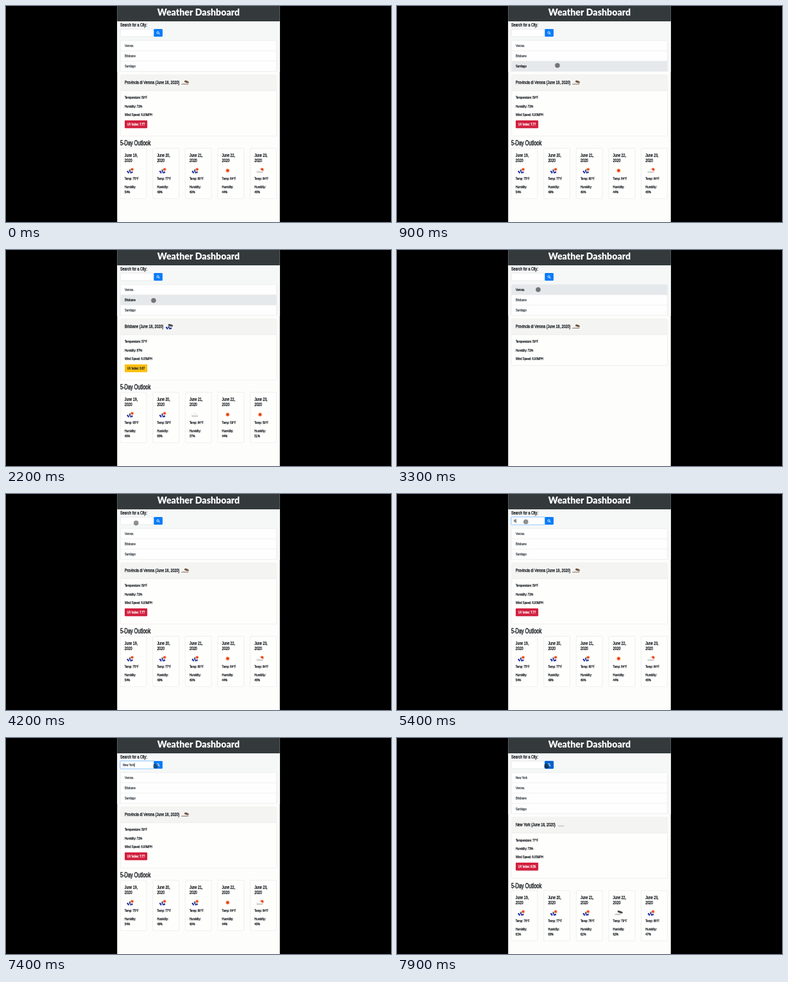
Recreate the animation shown at these times as an HTML page with a canvas. Size 600 by 338 pixels, loop 8 s.

```html
<!DOCTYPE html>
<html lang="en">
<head>
<meta charset="utf-8">
<title>Weather Dashboard</title>
<style>
html, body { margin: 0; width: 100%; height: 100%; overflow: hidden; background: #000; }
canvas { display: block; }
</style>
</head>
<body>
<canvas id="stage" width="600" height="338"></canvas>
<script>
const ctx = document.getElementById('stage').getContext('2d');
const LOOP = 8000, ROW = 16.1, NARROW = 0.715;
const FACE = '"Liberation Sans", Arial, sans-serif';
const INK = '#212529', LINE = '#dfe0e1';
const RED = '#d2203f', GREEN = '#2fb84a', YELLOW = '#fdc010';

// day: [icon, temperature, humidity]
const cities = {
  verona: { name: 'Provincia di Verona', icon: 'mixed', temp: 59, hum: 72, wind: '6.93', uv: '7.77', color: RED,
    days: [['rain', 75, 54], ['rain', 77, 49], ['rain', 80, 49], ['sun', 84, 44], ['fair', 84, 46]] },
  santiago: { name: 'Santiago', icon: 'clouds', temp: 50, hum: 81, wind: '1.79', uv: '2.69', color: GREEN,
    days: [['rain', 53, 62], ['clouds', 56, 57], ['clouds', 58, 42], ['clouds', 58, 47], ['rain', 49, 73]] },
  brisbane: { name: 'Brisbane', icon: 'shower', temp: 57, hum: 87, wind: '8.05', uv: '3.67', color: YELLOW,
    days: [['rain', 65, 49], ['rain', 59, 83], ['cloud', 64, 37], ['sun', 59, 44], ['sun', 59, 51]] },
  newYork: { name: 'New York', icon: 'flat', temp: 77, hum: 73, wind: '8.05', uv: '9.59', color: RED,
    days: [['rain', 76, 61], ['rain', 77, 63], ['rain', 78, 62], ['clouds', 79, 62], ['rain', 86, 47]] }
};

// [start, city, fully loaded]
const loads = [
  [0, 'verona', true], [1000, 'santiago', false], [1100, 'santiago', true],
  [2000, 'brisbane', false], [2150, 'brisbane', true],
  [3200, 'verona', false], [3400, 'verona', true],
  [7600, 'newYork', false], [7750, 'newYork', true]
];
// [time, x, y]
const pointer = [
  [400, 262, 112], [800, 250, 93], [1500, 250, 93], [1900, 230, 79],
  [2700, 230, 79], [3050, 220, 62], [3800, 220, 62], [4300, 200.8, 43.5],
  [7000, 200.8, 43.5], [7300, 233, 44], [8000, 233, 44]
];
const presses = [[900, 1100], [1950, 2350], [3150, 3450], [4350, 4450], [7450, 8000]];
const keys = [5300, 5500, 5650, 5800, 5950, 6050, 6150, 6250];

function text(s, x, y, size = 5.27, color = INK) {
  ctx.save();
  ctx.translate(x, y);
  ctx.scale(NARROW, 1);
  ctx.font = `${size * 1.13}px ${FACE}`;
  ctx.fillStyle = ctx.strokeStyle = color;
  ctx.lineWidth = size * 0.06;
  ctx.lineJoin = 'round';
  ctx.fillText(s, 0, 0);
  ctx.strokeText(s, 0, 0);
  const width = ctx.measureText(s).width * NARROW;
  ctx.restore();
  return width;
}

function textWidth(s, size) {
  ctx.font = `${size * 1.13}px ${FACE}`;
  return ctx.measureText(s).width * NARROW;
}

function box(x, y, w, h, fill, stroke, r = 1.3, weight = 0.5) {
  ctx.beginPath();
  ctx.roundRect(x, y, w, h, r);
  if (fill) { ctx.fillStyle = fill; ctx.fill(); }
  if (stroke) { ctx.strokeStyle = stroke; ctx.lineWidth = weight; ctx.stroke(); }
}

function blob(x, y, rx, ry, color, tilt = 0) {
  ctx.beginPath();
  ctx.ellipse(x, y, rx, ry, tilt, 0, 7);
  ctx.fillStyle = color;
  ctx.fill();
}

function line(x1, y1, x2, y2, color, weight = 0.6) {
  ctx.beginPath();
  ctx.moveTo(x1, y1);
  ctx.lineTo(x2, y2);
  ctx.strokeStyle = color;
  ctx.lineWidth = weight;
  ctx.stroke();
}

function sun(x, y, r) {
  blob(x, y, r + 0.9, r + 0.9, '#ffb58a');
  blob(x, y, r, r, '#e8401c');
}

function drops() {
  for (const [x, y] of [[-4, 1.8], [-2.8, 3.4], [-0.6, 1.2], [0.8, 3.4], [2.8, 3]]) {
    blob(x, y, 1.2, 1.3, '#1c2a94', 0.4);
  }
}

function paleCloud() {
  blob(-1, 1.2, 4.6, 1.8, '#d2d2d2');
  blob(-0.5, 0, 2.6, 1.6, '#d2d2d2');
  blob(-1, 0.9, 4.3, 1.5, '#f6f6f6');
  blob(-0.5, -0.1, 2.2, 1.3, '#f6f6f6');
  line(-5.5, 2.9, 4.5, 2.9, '#a39b99', 0.8);
}

const icons = {
  rain() { drops(); sun(3, -1.6, 1.7); blob(-0.5, -0.6, 1.6, 0.8, '#555a78'); },
  sun() { sun(0, 0.3, 2.2); },
  cloud: paleCloud,
  fair() { sun(3, -1.3, 2); paleCloud(); },
  clouds() {
    blob(2.3, -1, 4.3, 1.7, '#4a4a4a', 0.3);
    blob(-1, 1.4, 3.5, 1.1, '#ededed');
    line(-6, 2.9, 3, 2.9, '#8a8a8a', 0.9);
  },
  mixed() {
    blob(2.2, -0.8, 3.6, 1.8, '#665044', 0.35);
    blob(4, 0.6, 1.3, 1, '#b2884e');
    blob(-1, 1.2, 3.5, 1.2, '#eee6e1');
    line(-6, 2.8, 5, 2.8, '#7c655a', 0.9);
  },
  shower() { drops(); blob(2.2, -1.6, 4, 1.8, '#4c4f4a', 0.3); },
  flat() {
    blob(0, 0.8, 4.5, 1.5, '#f0f0f0');
    line(-5, 2.2, 5, 2.2, '#b0b0b0', 0.9);
  }
};

function icon(kind, x, y) {
  ctx.save();
  ctx.translate(x, y);
  icons[kind]();
  ctx.restore();
}

function pointerAt(t) {
  if (t < 400 || (t >= 5500 && t < 7000)) return null;
  const i = pointer.findIndex(p => p[0] > t);
  const [t0, x0, y0] = pointer[i - 1], [t1, x1, y1] = pointer[i];
  const u = (t - t0) / (t1 - t0), e = u * u * (3 - 2 * u);
  return { x: x0 + (x1 - x0) * e, y: y0 + (y1 - y0) * e };
}

function drawSearch(t) {
  text('Search for a City:', 178, 32, 6.7);
  const focus = t >= 4400 && t < 7450, clicked = t >= 7450;
  if (focus) box(177.6, 35.6, 53.3, 12.8, null, '#bfdeff', 1.6, 1.4);
  box(178.2, 36.2, 52.4, 11.8, '#fff', focus ? '#80bdff' : '#ced4da');
  if (clicked) box(229.7, 35.4, 14.8, 13.2, '#8fc2fb', null, 2);
  box(230.4, 36, 13.6, 12, clicked ? '#0062cc' : '#087cf8');
  ctx.beginPath();
  ctx.arc(236.7, 41.7, 1.6, 0, 7);
  ctx.strokeStyle = '#fff';
  ctx.lineWidth = 0.9;
  ctx.stroke();
  line(237.9, 42.9, 239.4, 44.4, '#fff', 1);
  const typed = t < 7600 ? 'New York'.slice(0, keys.filter(k => k <= t).length) : '';
  const w = text(typed, 182, 44, 5.27, '#495057');
  if (focus && (t - 200) % 1000 < 600) line(182.5 + w, 39, 182.5 + w, 45.5, '#222', 0.6);
}

function drawList(names, at, pressed) {
  const h = names.length * ROW;
  box(178.2, 54, 243.4, h, '#fefefe', LINE);
  names.forEach((name, i) => {
    const y = 54 + i * ROW;
    const over = at && at.y >= y && at.y < y + ROW;
    if (over) box(178.4, y + 0.2, 243, ROW - 0.4, pressed ? '#e6e9ec' : '#f3f4f6', null, 0);
    if (i) line(178.2, y, 421.6, y, LINE, 0.5);
    text(name, 185, y + 10.2, 5.27, over && pressed ? INK : '#495057');
  });
}

function drawCity(c, full) {
  box(178.2, 107.8, 243.4, full ? 95.6 : 73, '#fefefd', LINE);
  box(178.4, 108, 243, 24.6, '#f4f4f3', null, 1);
  line(178.2, 132.6, 421.6, 132.6, LINE, 0.5);
  const w = text(`${c.name} (June 18, 2020)`, 185, 122, 6.65);
  icon(c.icon, 185 + w + 9, 119.5);
  text(`Temperature: ${c.temp}°F`, 185, 145.4);
  text(`Humidity: ${c.hum}%`, 185, 158.8);
  text(`Wind Speed: ${c.wind}MPH`, 185, 172);
  if (!full) return;

  const label = `UV Index: ${c.uv}`;
  box(185, 179, textWidth(label, 5.1) + 8, 12.3, c.color);
  text(label, 189, 187.2, 5.1, c.color === YELLOW ? INK : '#fff');

  text('5-Day Outlook', 178, 218.4, 9.2);
  c.days.forEach(([kind, temp, hum], i) => {
    const x = 178.2 + i * 50.6, tx = x + 6.6;
    box(x, 222.6, 40.8, 78.8, '#fefefd', LINE);
    text(`June ${19 + i},`, tx, 236, 6.6);
    text('2020', tx, 243.8, 6.6);
    icon(kind, x + 15.4, 257.2);
    text(`Temp: ${temp}°F`, tx, 271.6);
    text('Humidity:', tx, 285);
    text(`${hum}%`, tx, 293);
  });
}

function drawPage(shift) {
  const x = 173.25, w = 253.5;
  const fill = (color, y, h) => { ctx.fillStyle = color; ctx.fillRect(x, y, w, h); };
  ctx.fillStyle = '#000';
  ctx.fillRect(0, 0, 600, 338);
  fill('#fdfdfc', 0, 338);
  fill('#f6f8f8', 23, 80 + shift);
  fill('#343a3c', 0, 24);
  ctx.font = `900 14.2px Lato, ${FACE}`;
  ctx.fillStyle = '#fff';
  ctx.textAlign = 'center';
  ctx.fillText('Weather Dashboard', 300, 15);
  ctx.textAlign = 'left';
}

function draw(t) {
  const [, key, full] = loads.filter(l => l[0] <= t).pop();
  const at = pointerAt(t);
  const pressed = presses.some(([a, b]) => t >= a && t < b);
  const names = ['Verona', 'Brisbane', 'Santiago'];
  const shift = key === 'newYork' ? ROW : 0;
  if (shift) names.unshift('New York');

  drawPage(shift);
  drawSearch(t);
  drawList(names, at, pressed);
  ctx.save();
  ctx.translate(0, shift);
  drawCity(cities[key], full);
  ctx.restore();

  if (at) blob(at.x, at.y, 3.8, 3.8, pressed ? 'rgba(20,20,20,.55)' : 'rgba(40,40,40,.52)');
}

function tick() {
  draw(performance.now() % LOOP);
  requestAnimationFrame(tick);
}
tick();
</script>
</body>
</html>
```
